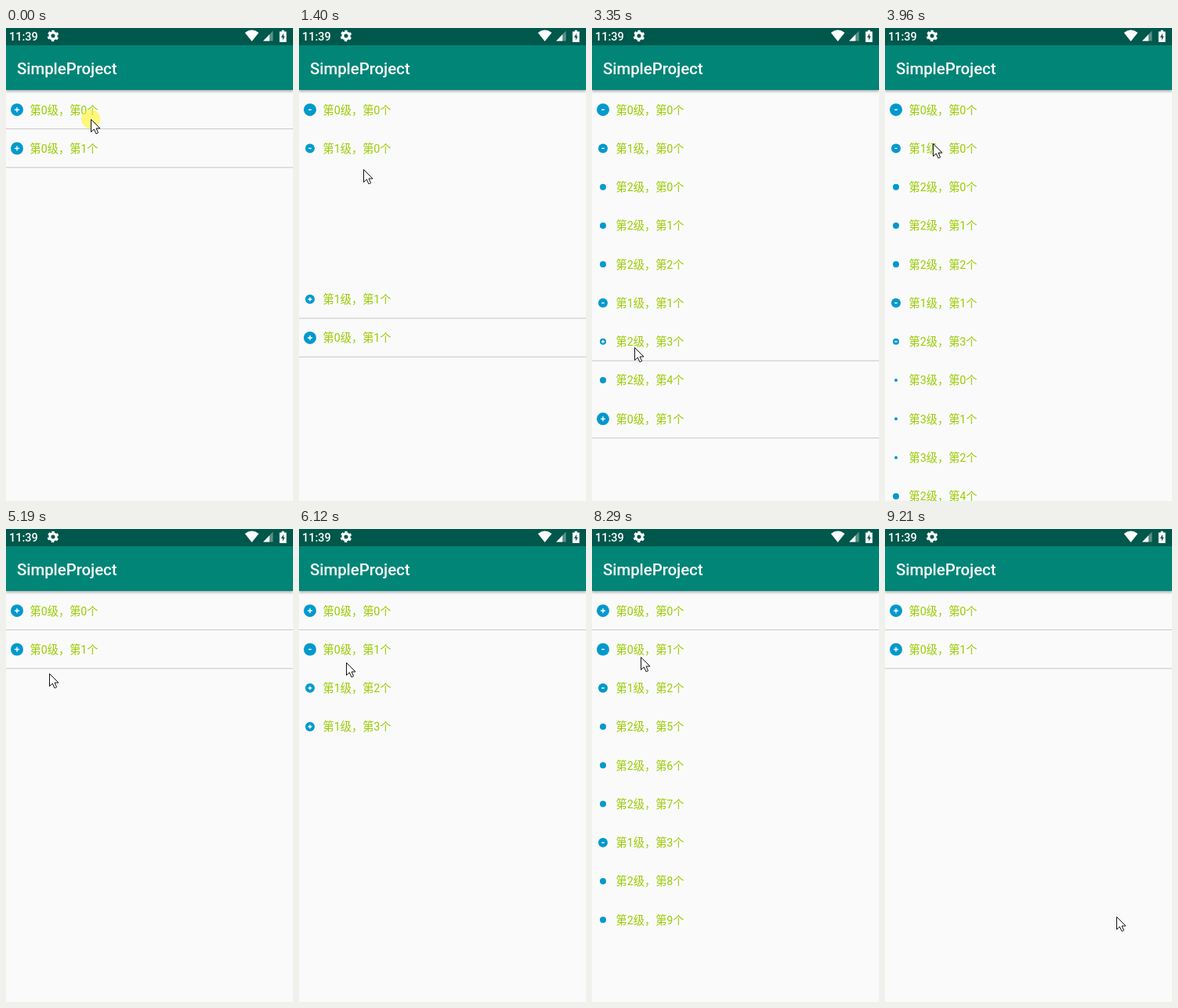
Animation, 366 px wide and 603 px high, one loop 9.29 s. Source, as an HTML page:

```html
<!DOCTYPE html>
<html lang="zh-CN">
<head>
<meta charset="utf-8">
<title>SimpleProject</title>
<style>
  html, body { margin: 0; width: 100%; height: 100%; overflow: hidden; background: #fafafa; }
  #stage { position: absolute; left: 0; top: 0; width: 366px; height: 603px; overflow: hidden;
    font-family: Roboto, "Noto Sans CJK SC", "Noto Sans CJK", sans-serif; }
  .row, .face, #list { position: absolute; left: 0; top: 0; width: 366px; }
  svg { position: absolute; left: 0; top: 0; overflow: visible; }
  .label { font-size: 14.23px; fill: #99cc00; }
  .dot { fill: #0099cc; }
  .sign { stroke: #fff; fill: none; }
  .line { fill: #cbcbcb; }
  #bar { position: absolute; top: 0; width: 366px; height: 79px; background: #008577;
    box-shadow: 0 2px 3px rgba(0, 0, 0, .3); }
  #status { height: 22px; background: #00574b; }
  #bar text { fill: #fff; font-weight: 500; }
  #ring { fill: #fff500; fill-opacity: .5; }
</style>
</head>
<body>
<div id="stage">
  <div id="list"></div>
  <div id="bar">
    <div id="status"></div>
    <svg width="366" height="79">
      <text x="4" y="15.6" font-size="14.5">11:39</text>
      <text x="14" y="59" font-size="20.33">SimpleProject</text>
      <g fill="none" stroke="#fff" transform="translate(60 10) rotate(-105)">
        <circle r="4.1" stroke-width="3.2"/>
        <circle r="6.1" stroke-width="2.4" stroke-dasharray="3.2 3.188"/>
      </g>
      <g fill="#fff">
        <path d="M313.5 17 304.7 6Q313.5-.9 322.3 6Z"/>
        <path d="M328 16.5 340.5 3.5V16.5Z" opacity=".35"/>
        <path d="M328 16.5 336 8.2V16.5Z"/>
        <path d="M351.7 2.8h3v1.6h2.9V18h-8.8V4.4h2.9Z"/>
      </g>
      <path d="M353.9 6.8 350.9 12h1.9v3.8L355.7 10.5h-1.8Z" fill="#00574b"/>
    </svg>
  </div>
  <svg width="366" height="603">
    <g id="pointer">
      <circle id="ring" r="12"/>
      <path d="M.5.5V16.5L4.3 13 7 18.8 9.6 17.6 7 12H12Z" fill="#fff" stroke="#111" stroke-width="1"/>
    </g>
  </svg>
</div>
<script>
const LOOP = 9290, PITCH = 49.27, TOP = 104.2, MOVE = 250, FADE = 120;
const list = document.getElementById('list');
const pointer = document.getElementById('pointer');
const ring = document.getElementById('ring');

const ease = p => .5 - Math.cos(Math.PI * Math.min(1, Math.max(0, p))) / 2;

// Follow a chain of [start, value] steps, each lasting dur.
const follow = (from, steps, t, dur) =>
  steps.reduce((v, [s, to]) => v + (to - v) * ease((t - s) / dur), from);

function face(level, n, sign, line) {
  const half = sign === '+' ? 3 - level / 2 : 1.8;
  const upright = sign === '+' ? `M14 ${-half}v${2 * half}` : '';
  const mark = sign ? `<path class="sign" stroke-width="1.4" d="M${14 - half} 0h${2 * half}${upright}"/>` : '';
  const rule = line ? '<rect class="line" y="23.8" width="366" height="1.1"/>' : '';
  const el = document.createElement('div');
  el.className = 'face';
  el.innerHTML = `<svg width="366" height="1"><circle class="dot" cx="14" r="${8 - 2 * level}"/>${mark}` +
    `<text class="label" x="30.5" y="5.4">第${level}级，第${n}个</text>${rule}</svg>`;
  return el;
}

// The tree: nodes are numbered per level in reading order.
const counters = [0, 0, 0, 0];
const nodes = {};
const kidCount = (level, n) => [2, 3 - n % 2, n === 3 ? 3 : 0, 0][level];

function grow(level, branch) {
  const n = counters[level]++;
  const root = level ? branch : n;
  const count = kidCount(level, n);
  const el = document.createElement('div');
  el.className = 'row';
  const shut = face(level, n, count ? '+' : '', count && (!level || !root));
  const wide = face(level, n, count ? '-' : '', false);
  el.append(shut, wide);
  list.append(el);
  const node = { el, shut, wide, at: n, open: false, alpha: level ? 0 : 1, fades: [], moves: [], turns: [] };
  node.kids = Array.from({ length: count }, () => grow(level + 1, root));
  return nodes[`${level}-${n}`] = node;
}
const roots = [grow(0), grow(0)];

const visible = (group = roots) => group.flatMap(n => [n, ...(n.open ? visible(n.kids) : [])]);

// Removed rows fade first, then the rest move, then new rows fade in.
function toggle(time, node) {
  const before = visible();
  node.open = !node.open;
  const after = visible();
  const moveAt = time + (node.open ? 0 : FADE);
  node.turns.push([moveAt, +node.open]);
  before.filter(n => !after.includes(n)).forEach(n => n.fades.push([time, 0]));
  after.forEach((n, i) => {
    if (before.includes(n)) return n.moves.push([moveAt, i]);
    n.at = i;
    n.fades.push([moveAt + MOVE, 1]);
  });
}

// Taps: time, node, pointer x, y
const taps = [
  [240, '0-0', 108, 116], [1180, '1-0', 75, 153], [2314, '1-1', 63, 348],
  [3440, '2-3', 54, 407], [4440, '0-0', 62, 108], [5620, '0-1', 60, 170],
  [7050, '1-3', 65, 252], [7680, '1-2', 64, 203], [8610, '0-1', 62, 163]
];
taps.forEach(([time, key]) => toggle(time, nodes[key]));

// The pointer rests around each tap, with a few stops in between.
const stops = [
  [740, 108, 116], [1400, 82, 180], [5190, 55, 184], [6300, 60, 170], [7290, 64, 203], [9190, 295, 494]
];
const path = taps.flatMap(([t, , x, y]) => [[t - 300, x, y], [t - 60, x, y]])
  .concat(stops).sort((a, b) => a[0] - b[0]);
path.push([LOOP, ...path[path.length - 1].slice(1)]);

function drawRow(n, t) {
  const alpha = follow(n.alpha, n.fades, t, FADE);
  const turn = follow(0, n.turns, t, MOVE);
  n.el.style.display = alpha > 0 ? '' : 'none';
  n.el.style.opacity = alpha;
  n.el.style.transform = `translateY(${TOP + PITCH * follow(n.at, n.moves, t, MOVE)}px)`;
  n.shut.style.opacity = 1 - turn;
  n.wide.style.opacity = turn;
}

function draw(t) {
  Object.values(nodes).forEach(n => drawRow(n, t));
  const i = path.findIndex(p => p[0] > t);
  const [a, b] = [path[i - 1], path[i]];
  const p = ease((t - a[0]) / (b[0] - a[0]));
  const [x, y] = [1, 2].map(k => a[k] + (b[k] - a[k]) * p);
  pointer.setAttribute('transform', `translate(${x} ${y})`);
  ring.style.display = taps.some(([at]) => t >= at - 300 && t < at - 125) ? '' : 'none';
}

const start = performance.now();
function tick() {
  draw((performance.now() - start) % LOOP);
  requestAnimationFrame(tick);
}
tick();
</script>
</body>
</html>
```
